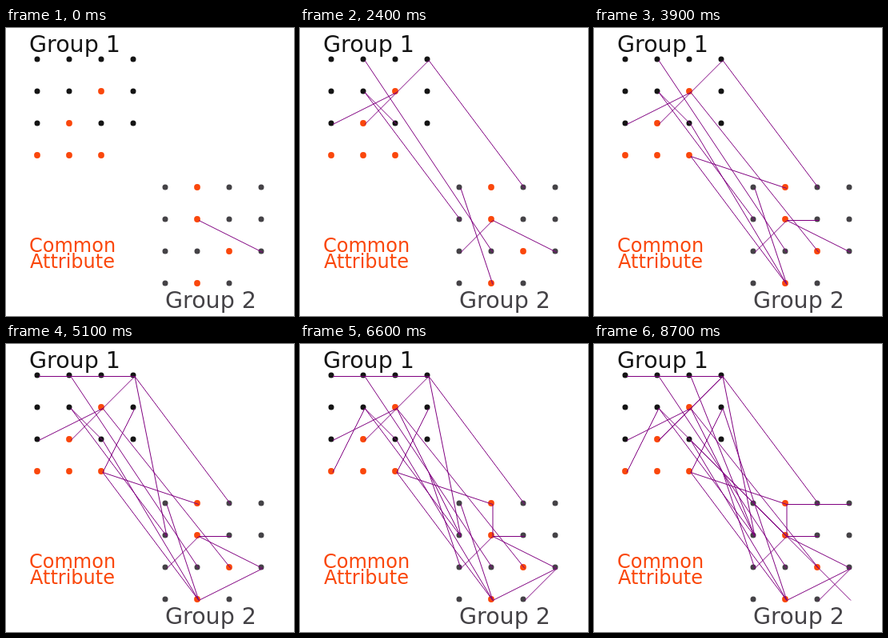
These frames come from a looping animation (360x360 px, 9000 ms). An HTML page with a canvas:

```html
<!DOCTYPE html>
<html lang="en">
<head>
<meta charset="utf-8">
<title>Connecting groups</title>
<style>
  html, body { margin: 0; width: 100%; height: 100%; overflow: hidden; background: #fff; }
  canvas { display: block; width: 360px; height: 360px; }
</style>
</head>
<body>
<canvas id="stage" width="360" height="360"></canvas>
<script>
const ctx = document.getElementById('stage').getContext('2d');
const STEP = 300;
const GAP = 40;
const BLACK = '#141414', GRAY = '#444246', ORANGE = '#fa470b', PURPLE = '#800080';

// Each link joins two grid points, written as column,row-column,row.
const links = `
  6,6-8,7  1,3-3,2  2,2-3,3  2,1-6,7  5,7-6,6
  4,1-2,3  4,1-7,5  2,2-5,6  5,5-6,8
  3,4-6,5  3,4-6,8  3,2-7,7  6,6-7,6  3,3-6,8
  1,1-4,1  4,1-5,6  4,2-3,4  8,7-6,8  8,7-7,8  3,2-5,6  4,4-5,7
  2,2-1,4  6,5-6,6  3,1-5,6  3,3-6,6  4,1-2,3
  6,5-8,5  4,2-5,5  5,5-6,6  3,3-8,8
`.trim().split(/\s+/).map(link => link.split(/[,-]/).map(n => n * GAP));

const groups = [
  { first: 1, color: BLACK, common: ['3,2', '2,3', '1,4', '2,4', '3,4'] },
  { first: 5, color: GRAY, common: ['6,5', '6,6', '7,7', '6,8'] }
];

function label(text, x, y, size, color) {
  ctx.font = `${size}px "DejaVu Sans", sans-serif`;
  ctx.fillStyle = color;
  ctx.fillText(text, x, y);
}

function drawGroup({ first, color, common }) {
  // The last corner of each square stays empty.
  for (let i = 0; i < 15; i++) {
    const col = first + i % 4;
    const row = first + Math.floor(i / 4);
    const shared = common.includes(`${col},${row}`);
    ctx.fillStyle = shared ? ORANGE : color;
    ctx.beginPath();
    ctx.arc(col * GAP - 1, row * GAP - 1, shared ? 3.9 : 3.5, 0, Math.PI * 2);
    ctx.fill();
  }
}

function draw(count) {
  ctx.fillStyle = '#fff';
  ctx.fillRect(0, 0, 360, 360);
  groups.forEach(drawGroup);
  label('Group 1', 29, 30, 28.5, BLACK);
  label('Group 2', 199, 350, 28.5, GRAY);
  label('Common', 29, 280, 24, ORANGE);
  label('Attribute', 30, 300, 24, ORANGE);

  ctx.strokeStyle = PURPLE;
  ctx.lineWidth = 1;
  for (const [x1, y1, x2, y2] of links.slice(0, count)) {
    ctx.beginPath();
    ctx.moveTo(x1 + 1, y1 + 0.5);
    ctx.lineTo(x2 + 1, y2 + 0.5);
    ctx.stroke();
  }
}

const start = performance.now();
function tick() {
  const elapsed = performance.now() - start;
  draw(Math.floor(elapsed / STEP) % links.length + 1);
  requestAnimationFrame(tick);
}
tick();
</script>
</body>
</html>
```
